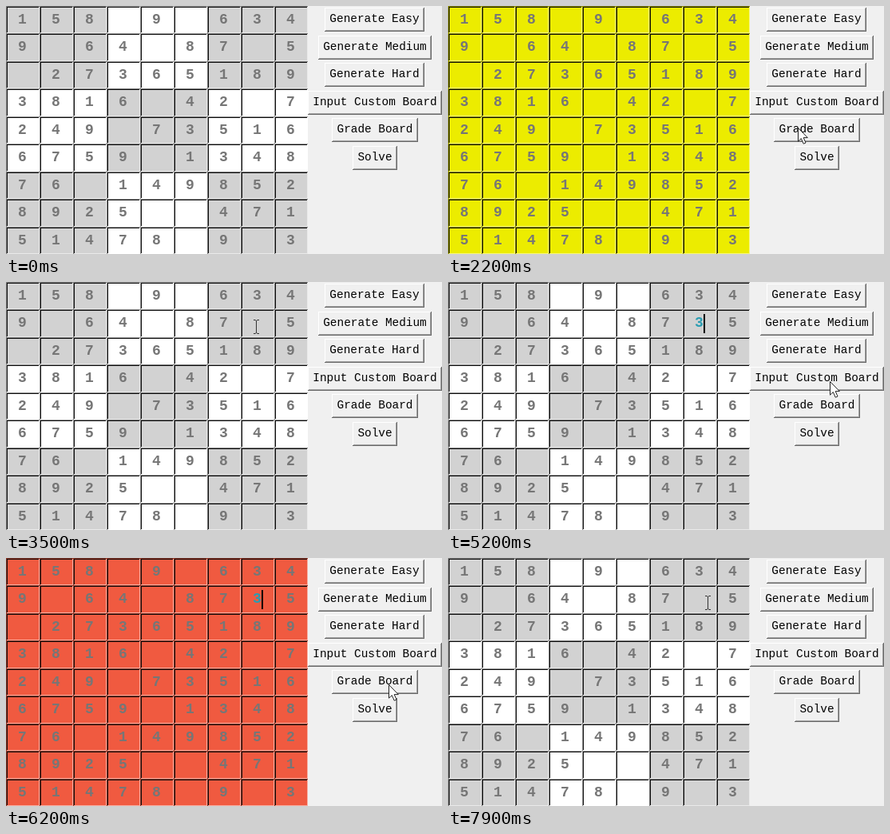
These frames come from a looping animation (546 px wide and 310 px high, 8000 ms). An HTML page:

```html
<!DOCTYPE html>
<html lang="en">
<head>
<meta charset="utf-8">
<title>Sudoku board</title>
<style>
  html, body { margin: 0; width: 100%; height: 100%; overflow: hidden; background: #f0f0f0; }
  body { position: relative; font-family: "Courier New", "Liberation Mono", monospace; }
  .cell, .btn, .caret, .pointer, .pointer svg { position: absolute; box-sizing: border-box; }

  .cell {
    --base: #fff;
    --bg: var(--base);
    --dark: color-mix(in srgb, var(--bg) 60%, #000);
    --light: color-mix(in srgb, var(--bg) 50%, #fff);
    width: 42px;
    padding-right: 1px;
    text-align: center;
    font-weight: bold;
    font-size: 18px;
    color: #767676;
    background: var(--bg);
    box-shadow: inset 1px 1px var(--dark), inset -1px -1px var(--light),
                inset 2px 2px #0c0c0c, inset -2px -2px var(--bg);
    animation: grade 8s step-end infinite;
  }
  .shade { --base: #d2d2d2; }
  .typed { color: #2a9db2; animation: typed 8s step-end infinite; }
  .caret { top: 40px; width: 2px; height: 24px; background: #000; animation: caret 8s step-end infinite; }

  .btn {
    height: 30px;
    line-height: 29px;
    text-align: center;
    white-space: pre;
    font-size: 14.4px;
    color: #000;
    background: #f0f0f0;
    box-shadow: inset -1px -1px #696969, inset 1px 1px #fff, inset -2px -2px #a0a0a0;
  }

  .pointer { left: 0; top: 0; animation: move 8s ease-in-out infinite; }
  .pointer svg { overflow: visible; left: 0; top: 0; width: 1px; height: 1px; }
  .arrow { animation: arrow 8s step-end infinite; }
  .beam { animation: beam 8s step-end infinite; }

  @keyframes grade {
    0%, 42.5%, 90%, 100% { --bg: var(--base); }
    26.25% { --bg: #ecec00; }
    75% { --bg: #f05a40; }
  }
  @keyframes typed {
    0%, 96.25%, 100% { opacity: 0; }
    55% { opacity: 1; }
  }
  @keyframes caret {
    0% { opacity: 0; left: 315px; }
    51.25% { opacity: 1; left: 315px; }
    55% { opacity: 1; left: 320px; }
    58.75%, 70%, 81.25%, 92.5%, 100% { opacity: 0; left: 320px; }
    62.5%, 73.75%, 85% { opacity: 1; left: 320px; }
  }
  @keyframes move {
    0%, 21.25% { transform: translate(452px, 312px); }
    25.6%, 31.25% { transform: translate(438px, 152px); }
    40%, 57.5% { transform: translate(313px, 56px); }
    65% { transform: translate(478px, 124px); }
    67.8%, 78.75% { transform: translate(479px, 158px); }
    92.5%, 100% { transform: translate(325px, 56px); }
  }
  @keyframes arrow {
    0%, 35.6%, 86.7%, 100% { opacity: 0; }
    21.25%, 60.8% { opacity: 1; }
  }
  @keyframes beam {
    0%, 55%, 60.8% { opacity: 0; }
    35.6%, 57.5%, 86.7%, 100% { opacity: 1; }
  }
</style>
</head>
<body>
<script>
  const rows = [
    "158 9 634", "9 64 87 5", " 27365189",
    "3816 42 7", "249 73516", "6759 1348",
    "76 149852", "8925  471", "51478 9 3"
  ];
  const buttons = [
    ["Generate Easy", 399, 125, 2], ["Generate Medium", 391, 142, 37],
    ["Generate Hard", 399, 125, 71], ["Input Custom Board", 378, 168, 106],
    ["Grade Board", 408, 108, 140], ["Solve", 434, 56, 175]
  ];

  function add(cls, text, style) {
    const el = document.createElement("div");
    el.className = cls;
    el.textContent = text;
    Object.assign(el.style, style);
    document.body.append(el);
    return el;
  }

  const rowTop = r => Math.round(r * 310 / 9);

  rows.forEach((row, r) => [...row].forEach((digit, c) => {
    const h = rowTop(r + 1) - rowTop(r);
    const shaded = (Math.floor(r / 3) + Math.floor(c / 3)) % 2 === 0;
    const cell = add(shaded ? "cell shade" : "cell", digit.trim(), {
      left: c * 42 + "px", top: rowTop(r) + "px", height: h + "px", lineHeight: h + "px"
    });
    if (r === 1 && c === 7) cell.innerHTML = '<div class="typed">3</div>';
  }));

  for (const [label, x, w, y] of buttons)
    add("btn", label, { left: x + "px", top: y + "px", width: w + "px" });

  add("caret", "", {});
  add("pointer", "", {}).innerHTML = `
    <svg class="arrow"><path d="M.5 .5V17.2L4.3 13.6L7.2 20.2L10 19L7.2 12.6H12.3Z" fill="#fff" stroke="#222"/></svg>
    <svg class="beam"><path d="M-3 -8.5H-1L.5 -7.5L2 -8.5H4M-3 8.5H-1L.5 7.5L2 8.5H4M.5 -7.5V7.5" fill="none" stroke="#333"/></svg>`;
</script>
</body>
</html>
```
